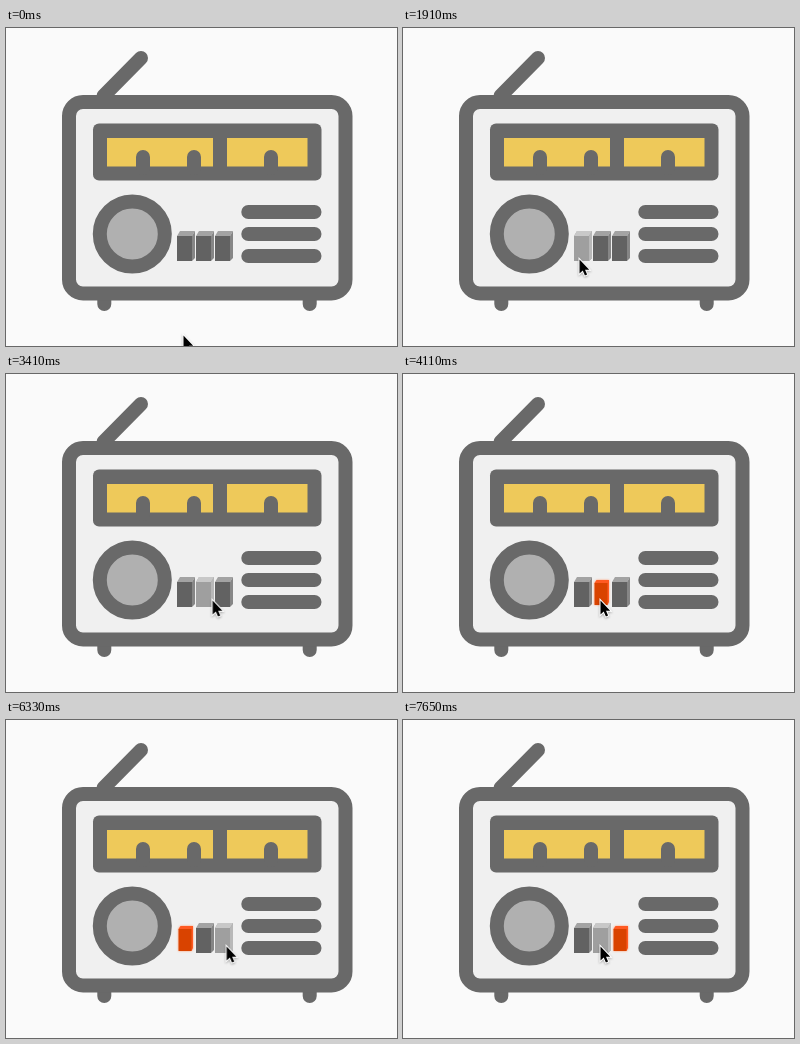
Recreate the animation shown at these times as an HTML page. Size 391x318 px, loop 8 s.

```html
<!DOCTYPE html>
<html lang="en">
<head>
<meta charset="utf-8">
<title>Radio buttons</title>
<style>
  html, body { margin: 0; width: 100%; height: 100%; overflow: hidden; background: #fafafa; }
  svg { display: block; width: 391px; height: 318px; }
  .line { fill: none; stroke: #696969; stroke-width: 14; stroke-linecap: round; }
  .face { fill: var(--face); }
  .top { fill: var(--top); }
  .side { fill: var(--side); }
  .idle { --face: #626262; --top: #a3a3a3; --side: #868686; }
  .over { --face: #9f9f9f; --top: #c8c8c8; --side: #b8b8b8; }
  .hot { filter: drop-shadow(0 0 1px #ff9a70); }

  .over, .on { opacity: 0; animation: 8s step-end infinite; }
  .b1 .over { animation-name: over1; }
  .b2 .over { animation-name: over2; }
  .b3 .over { animation-name: over3; }
  .b1 .on { animation-name: on1; }
  .b2 .on { animation-name: on2; }
  .b3 .on { animation-name: on3; }

  /* 1% = 80 ms */
  @keyframes over1 {
    0%, 30.875%, 74.5% { opacity: 0; }
    23.25%, 67.875% { opacity: 1; }
  }
  @keyframes over2 {
    0%, 37%, 51.375%, 78.625% { opacity: 0; }
    30.875%, 42.625%, 77.625%, 93.5% { opacity: 1; }
  }
  @keyframes over3 {
    0%, 42.625%, 90.125% { opacity: 0; }
    37%, 78.625% { opacity: 1; }
  }
  @keyframes on1 {
    0%, 90.125% { opacity: 0; }
    74.5% { opacity: 1; }
  }
  @keyframes on2 {
    0%, 74.5% { opacity: 0; }
    51.375% { opacity: 1; }
  }
  @keyframes on3 {
    0% { opacity: 0; }
    90.125% { opacity: 1; }
  }

  .cursor {
    filter: drop-shadow(0 1px .8px rgba(0, 0, 0, .3));
    animation: roam 8s linear infinite;
  }
  @keyframes roam {
    0%, .37% { transform: translate(176px, 306px); }
    .75% { transform: translate(176px, 312px); }
    1.12% { transform: translate(176px, 322px); }
    8.12% { transform: translate(193px, 322px); }
    8.5% { transform: translate(193px, 315px); animation-timing-function: ease-out; }
    12.5%, 17.63% { transform: translate(188px, 293px); animation-timing-function: ease-in-out; }
    23.25% { transform: translate(176px, 232px); }
    23.875% { transform: translate(175px, 230px); }
    25.625%, 29.75% { transform: translate(177px, 227px); }
    31.625%, 35.75% { transform: translate(195px, 227px); }
    36.125% { transform: translate(196px, 225px); }
    37.375%, 41.5% { transform: translate(213px, 225px); animation-timing-function: ease-out; }
    45.125%, 58.5% { transform: translate(196px, 225px); }
    60.875%, 65% { transform: translate(199px, 244px); }
    67.125% { transform: translate(193px, 229px); }
    69.25%, 77.13% { transform: translate(182px, 226px); }
    79.125% { transform: translate(219px, 225px); }
    79.5% { transform: translate(223px, 225px); }
    79.875%, 81.25% { transform: translate(222px, 224px); }
    83.75%, 92% { transform: translate(216px, 223px); }
    94% { transform: translate(205px, 231px); }
    95.625%, 99.99% { transform: translate(196px, 225px); }
    100% { transform: translate(176px, 306px); }
  }
</style>
</head>
<body>
<svg viewBox="0 0 391 318">
  <defs>
    <g id="key">
      <path class="top" d="M0 5 3 0H18L15 5z"/>
      <path class="side" d="M15 5 18 0V27L15 30z"/>
      <path class="face" d="M0 5H15V30H0z"/>
    </g>
    <g id="lit">
      <path fill="#f0f0f0" d="M-.5 -.5H18.5V30.5H-.5z"/>
      <g class="hot">
        <path fill="#ff5a22" d="M1.5 6 3.5 3H16V25L14.5 28z"/>
        <path fill="#d94300" d="M1.5 6H14.5V28H1.5z"/>
      </g>
    </g>
  </defs>

  <path class="line" d="M97.5 68 135 30M98.3 268V276M303.7 268V276"/>
  <rect x="63" y="74" width="276.5" height="191.5" rx="14" fill="#f0f0f0" stroke="#696969" stroke-width="14"/>

  <rect x="87" y="95.5" width="228.5" height="57" rx="6" fill="#696969"/>
  <path fill="#eec95a" d="M101 110H207V138.5H101zM221 110H301.5V138.5H221z"/>
  <path class="line" d="M137 129V140M188 129V140M265 129V140"/>

  <circle cx="126.3" cy="206" r="32.5" fill="#b0b0b0" stroke="#696969" stroke-width="14"/>
  <path class="line" d="M242.3 184H308.5M242.3 206H308.5M242.3 228H308.5"/>

  <g class="b1" transform="translate(171 203)">
    <use class="idle" href="#key"/><use class="over" href="#key"/><use class="on" href="#lit"/>
  </g>
  <g class="b2" transform="translate(190 203)">
    <use class="idle" href="#key"/><use class="over" href="#key"/><use class="on" href="#lit"/>
  </g>
  <g class="b3" transform="translate(209 203)">
    <use class="idle" href="#key"/><use class="over" href="#key"/><use class="on" href="#lit"/>
  </g>

  <g class="cursor">
    <path d="M1.5 1.5V15.5L4.7 12.5 6.9 17.4 9.1 16.4 7 11.7H11.2z" stroke="#fff" stroke-width="2" paint-order="stroke"/>
  </g>
</svg>
</body>
</html>
```
